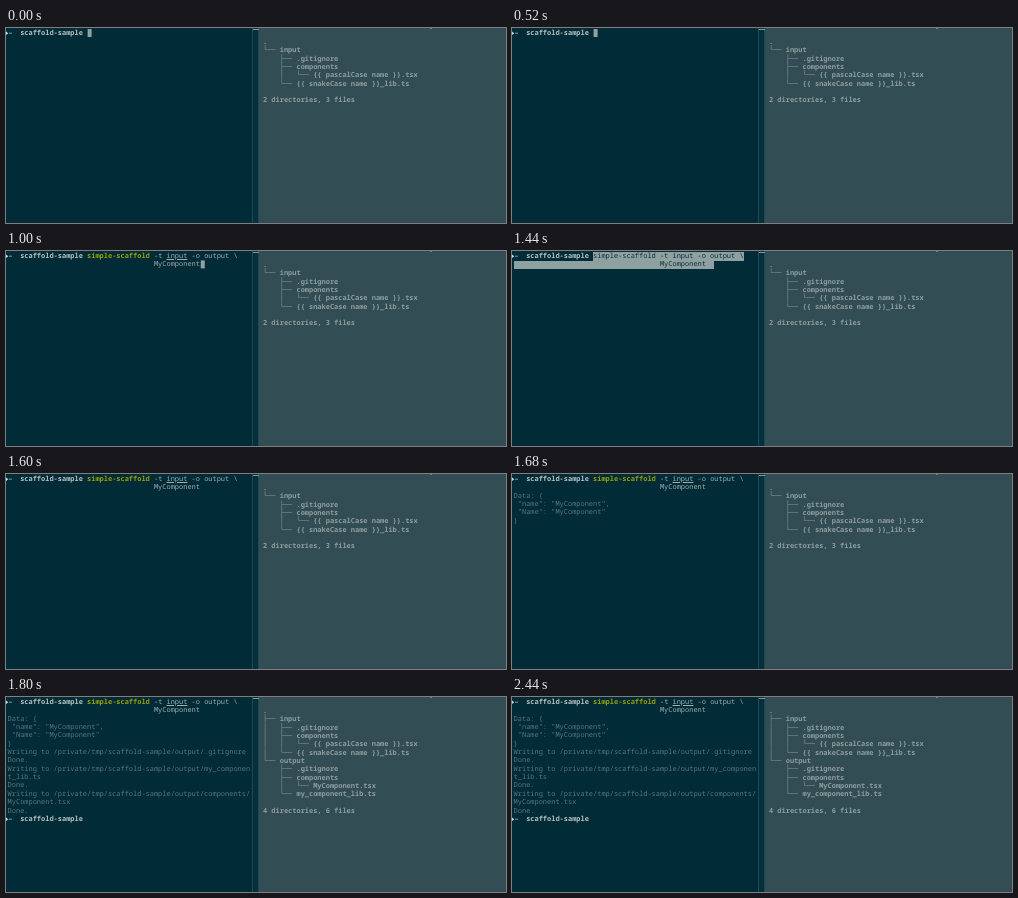
An HTML page that plays this animation: 500x195 px, repeating every 3040 ms.

```html
<!DOCTYPE html>
<html lang="en">
<head>
<meta charset="utf-8">
<title>Scaffold demo</title>
<style>
  :root { --cw: 4.19px; --lh: 8.36px; --x: 1.6px; --bg: #002b37; --loop: 3040ms; }
  html, body { margin: 0; width: 100%; height: 100%; overflow: hidden; background: var(--bg); }
  #stage { position: relative; width: 500px; height: 195px; overflow: hidden; background: var(--bg); }
  #stage > * { position: absolute; }
  pre {
    margin: 0; left: var(--x); top: 1.9px;
    font: 6.983px/var(--lh) "Noto Sans Mono", "DejaVu Sans Mono", monospace;
    font-variant-ligatures: none; text-rendering: geometricPrecision;
    color: #5a767d;
  }
  b { color: #b6c2c0; }
  .cmd b { color: #98a008; }
  .cmd { color: #a0aeae; font-weight: 500; }
  u { text-decoration-thickness: .6px; text-underline-offset: 1px; }

  .gap { left: 246px; width: 7px; height: 195px; background: #03303b; border: solid #1d4a54; border-width: 0 1px; box-sizing: border-box; }
  .side { left: 253px; width: 247px; height: 195px; background: #334d54; }
  .edge { left: 247px; top: 1px; width: 6px; height: 1px; background: #7f9a9e; }
  .speck { left: 424px; top: 0; width: 2px; height: 1px; background: #6d8285; }
  .tree { left: 257px; top: calc(2.5px + var(--lh)); color: #8e9d9e; font-weight: 600; }

  .arrow { left: 0; top: 1px; }
  .arrow.end { top: calc(1px + 14 * var(--lh)); }

  .cover { left: calc(var(--x) + 19 * var(--cw)); top: .6px; width: 160px; height: 10px; background: var(--bg); }
  .cursor { left: var(--x); top: 1px; width: 4.2px; height: 8px; background: #93a1a1; }
  .mark { background: #8fa0a1; height: 8.4px; }
  .m1 { left: calc(var(--x) + 19 * var(--cw)); top: 1.2px; width: 151px; }
  .m2 { left: var(--x); top: 9.5px; width: 200px; }
  .paste { color: #08303a; font-weight: 500; }

  .t { animation: var(--loop) step-end infinite; }
  .typed  { animation-name: typed; }
  .cover  { animation-name: cover; }
  .line2  { animation-name: line2; }
  .held   { animation-name: held; }
  .data   { animation-name: data; }
  .files  { animation-name: files; }
  .done   { animation-name: done; }
  .before { animation-name: before; }
  .after  { animation-name: after; }
  .cursor { animation-name: cursor; }

  @keyframes typed  { 0% { visibility: hidden } 30.263%, 100% { visibility: visible } }
  @keyframes line2  { 0% { visibility: hidden } 32.895%, 100% { visibility: visible } }
  @keyframes held   { 0% { visibility: hidden } 36.842% { visibility: visible } 52.632%, 100% { visibility: hidden } }
  @keyframes data   { 0% { visibility: hidden } 55.263%, 100% { visibility: visible } }
  @keyframes files  { 0% { visibility: hidden } 56.579%, 100% { visibility: visible } }
  @keyframes done   { 0% { visibility: hidden } 57.895%, 100% { visibility: visible } }
  @keyframes after  { 0% { visibility: hidden } 59.211%, 100% { visibility: visible } }
  @keyframes before { 0% { visibility: visible } 59.211%, 100% { visibility: hidden } }
  @keyframes cover {
    0% { transform: none }
    30.263% { transform: translateX(calc(9 * var(--cw))) }
    31.579% { transform: translateX(calc(21 * var(--cw))) }
    32.895%, 100% { transform: translateX(160px) }
  }
  @keyframes cursor {
    0% { transform: translate(calc(19 * var(--cw)), 0) }
    30.263% { transform: translate(calc(28 * var(--cw)), 0) }
    31.579% { transform: translate(calc(40 * var(--cw)), 0) }
    32.895% { transform: translate(calc(46 * var(--cw)), var(--lh)) }
    36.842% { transform: translate(calc(46.7 * var(--cw)), var(--lh)); opacity: 0 }
    52.632% { transform: translate(0, calc(2 * var(--lh))) }
    55.263% { transform: translate(0, calc(6 * var(--lh))) }
    56.579% { transform: translate(0, calc(14 * var(--lh))) }
    57.895%, 100% { transform: translate(calc(19 * var(--cw)), calc(14 * var(--lh))) }
  }
</style>
</head>
<body>
<div id="stage">
  <pre class="cmd t typed">                   <b>simple-scaffold</b> -t <u>input</u> -o output \</pre>
  <div class="cover t"></div>
  <pre class="cmd t line2">
&#8203;
                                   MyComponent</pre>
  <pre>   <b>scaffold-sample</b>
&#8203;
<span class="t data">Data: {
 "name": "MyComponent",
 "Name": "MyComponent"
}</span>
<span class="t files">Writing to /private/tmp/scaffold-sample/output/.gitignore
Done.
Writing to /private/tmp/scaffold-sample/output/my_componen
t_lib.ts
Done.
Writing to /private/tmp/scaffold-sample/output/components/
MyComponent.tsx
Done.</span>
<span class="t done">   <b>scaffold-sample</b></span></pre>
  <svg class="arrow" width="7" height="8">
    <g id="tip"><path fill="#d3dcdb" d="M0 2.4L2.3 4.2 0 6Z"/><path fill="#5f8b94" d="M3 3.6H6V4.8H3Z"/></g>
  </svg>
  <svg class="arrow end t done" width="7" height="8"><use href="#tip"/></svg>

  <div class="mark m1 t held"></div>
  <div class="mark m2 t held"></div>
  <pre class="paste t held">                   simple-scaffold -t input -o output \
                                   MyComponent</pre>
  <div class="cursor t"></div>

  <div class="gap"></div>
  <div class="side"></div>
  <div class="edge"></div>
  <div class="speck"></div>
  <pre class="tree t before">.
└── input
    ├── .gitignore
    ├── components
    │   └── {{ pascalCase name }}.tsx
    └── {{ snakeCase name }}_lib.ts

2 directories, 3 files</pre>
  <pre class="tree t after">.
├── input
│   ├── .gitignore
│   ├── components
│   │   └── {{ pascalCase name }}.tsx
│   └── {{ snakeCase name }}_lib.ts
└── output
    ├── .gitignore
    ├── components
    │   └── MyComponent.tsx
    └── my_component_lib.ts

4 directories, 6 files</pre>
</div>
</body>
</html>
```
